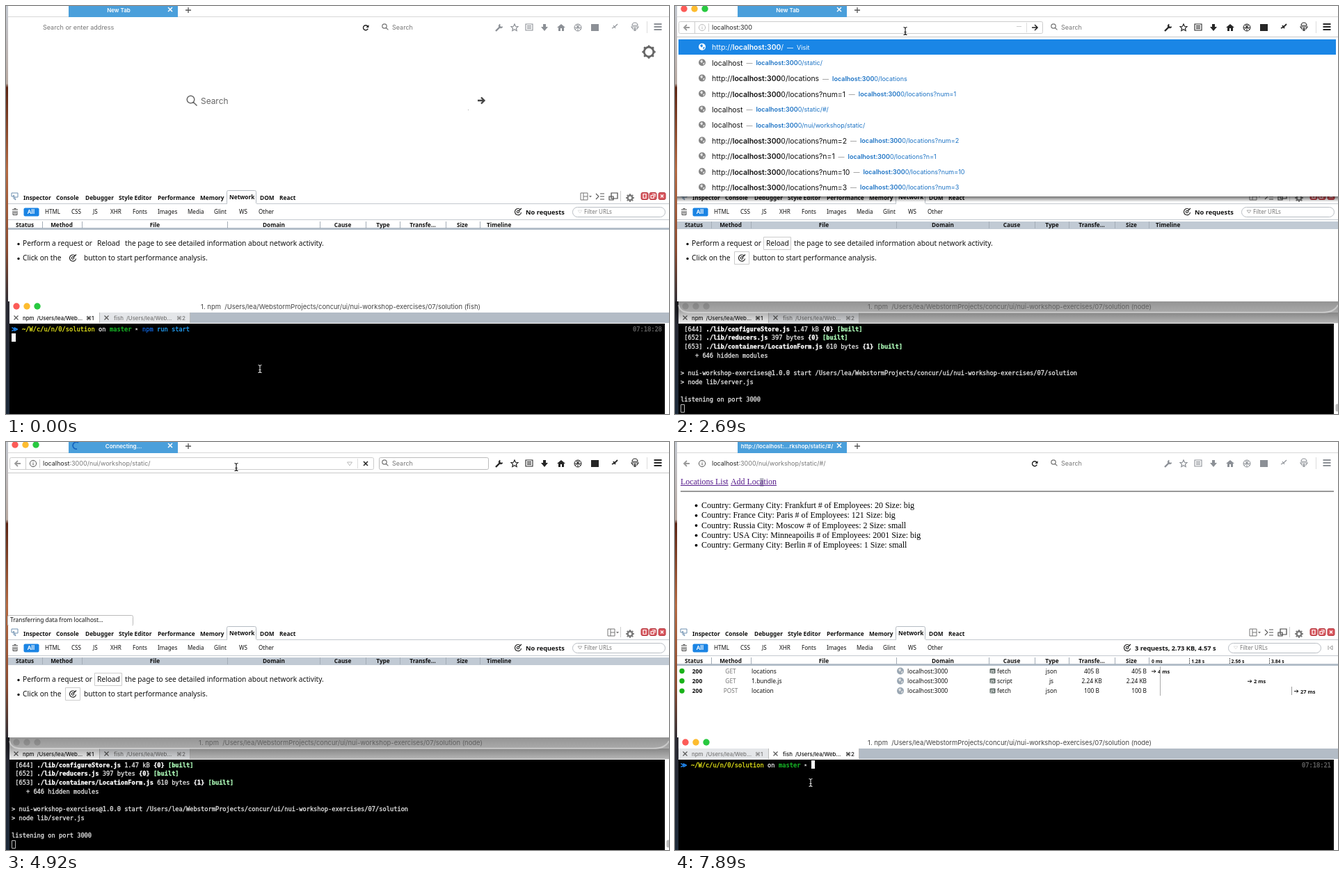
Animation of 953x587 px, one loop 8 s. Source, as an HTML page with a canvas:

```html
<!DOCTYPE html>
<html lang="en">
<head>
<meta charset="utf-8">
<style>
html, body { margin: 0; width: 100%; height: 100%; overflow: hidden; background: #fff; }
canvas { display: block; }
</style>
</head>
<body>
<canvas id="stage" width="953" height="587"></canvas>
<script>
const g = document.getElementById('stage').getContext('2d');
const LOOP = 8000;

const ui = (size, weight = 400) => `${weight} ${size}px Inter, sans-serif`;
const dev = (size, weight = 400) => `${weight} ${size}px "Noto Sans", sans-serif`;
const mono = (weight = 400) => `${weight} 8.7px "DejaVu Sans Mono", monospace`;
const serif = '11.95px "Liberation Serif", serif';

const path = '/Users/lea/WebstormProjects/concur/ui/nui-workshop-exercises/07/solution';
const script = name => `> nui-workshop-exercises@1.0.0 ${name} ${path}`;
const babel = file => `src/${file}.js -> lib/${file}.js`;
// Asterisks toggle bold.
const log = [
  null, '', script('prestart'), '> npm run prepack', '', '',
  script('prepack'), '> npm run build', '', '',
  script('build'), '> ../../node_modules/.bin/babel src --out-dir=lib', '',
  babel('app'), babel('configureStore'), babel('containers/LocationForm'),
  babel('reducers'), babel('server'), '',
  ' [644] *./lib/configureStore.js* 1.47 kB *{0}* *[built]*',
  ' [652] *./lib/reducers.js* 397 bytes *{0}* *[built]*',
  ' [653] *./lib/containers/LocationForm.js* 610 bytes *{1}* *[built]*',
  '    + 646 hidden modules', '',
  script('start'), '> node lib/server.js', '', 'listening on port 3000'
];

const loc = 'localhost:3000/';
const hit = s => ['http://' + loc + s, loc + s];
const local = s => ['localhost', loc + s];
const example = s => ['example', loc + 'nui/example/' + s];
const broadHits = [
  local('static/'), hit('locations'), hit('locations?num=1'), local('static/#/'),
  local('nui/workshop/static/'), hit('locations?num=2'), hit('locations?n=1'),
  hit('locations?num=10'), hit('locations?num=3')
];
const nuiHits = [
  local('nui/workshop/static/'), example('counter'), local('nui/workshop/static/#/add'),
  local('nui/workshop/static/#/'), example('page')
];

// Each key holds until the next one: [time, ...values].
const at = (t, keys) => keys.filter(k => k[0] <= t).pop().slice(1);
const pointer = [
  [0, 365, 522], [440, 363, 485], [590, 356, 385], [740, 346, 235], [890, 336, 95],
  [1040, 331, 42], [1190, 331, 36], [6120, 332, 36], [6270, 316, 42], [6420, 245, 50],
  [6570, 160, 56], [6720, 124, 58], [7300, 140, 130], [7450, 176, 300], [7590, 198, 425],
  [7740, 203, 449], [7890, 195, 490]
];
const lineCount = [[0, 1], [740, 5], [1190, 9], [1940, 14], [2090, 18], [2390, 23], [2540, 27], [2690, 28]];
const address = [
  [0, ''], [2090, 'loc'], [2390, 'localhost'], [2540, 'localhost:3'], [2690, 'localhost:300'],
  [3880, loc + 'nui'], [4030, loc + 'nui/workshop/static/'], [5220, loc + 'nui/workshop/static/#/']
];

function rect(x, y, w, h, color) {
  g.fillStyle = color;
  g.fillRect(x, y, w, h);
}
function fade(y, h, stops) {
  const shade = g.createLinearGradient(0, y, 0, y + h);
  stops.forEach(([p, c]) => shade.addColorStop(p, c));
  return shade;
}
function box(x, y, w, h, r, line, fill) {
  g.beginPath();
  g.roundRect(x + .5, y + .5, w, h, r);
  if (fill) { g.fillStyle = fill; g.fill(); }
  if (line) { g.strokeStyle = line; g.lineWidth = 1; g.stroke(); }
}
function dot(x, y, r, color) {
  g.beginPath();
  g.arc(x, y, r, 0, 7);
  g.fillStyle = color;
  g.fill();
}
// Draws text and returns the x where it ends.
function text(s, x, y, font, color = '#111', align = 'left') {
  g.font = font;
  g.fillStyle = color;
  g.textAlign = align;
  g.fillText(s, x, y);
  return x + g.measureText(s).width;
}
// Terminal text, thickened a little.
function term(s, x, y, color, weight = 400) {
  const end = text(s, x, y, mono(weight), color);
  g.strokeStyle = color;
  g.lineWidth = .3;
  g.strokeText(s, x, y);
  return end;
}
function icon(d, x, y, color, width = 1.3, fill) {
  g.save();
  g.translate(x, y);
  const p = new Path2D(d);
  g.strokeStyle = g.fillStyle = color;
  g.lineWidth = width;
  if (fill) g.fill(p);
  if (width) g.stroke(p);
  g.restore();
}
const circle = r => `M${r} 0A${r} ${r} 0 1 1 ${-r} 0A${r} ${r} 0 1 1 ${r} 0Z`;
const cross = 'M-3 -3L3 3M3 -3L-3 3';
const arrow = 'M-4 0H4M0 -4L4 0L0 4';
const lens = (x, y, r, color) =>
  icon(`${circle(r)}M${r * .7} ${r * .7}L${r * 1.7} ${r * 1.7}`, x, y, color, r > 4 ? 1.5 : 1.2);

function globe(x, y, color, land = '#e4e4e4') {
  dot(x, y, 5, color);
  icon('M-3 -2L0 -4L1 -1L-1 1ZM1 1L4 0L2 4Z', x, y, land, 0, true);
}
function gear(x, y, r, color, width) {
  icon(circle(r), x, y, color, width);
  for (let i = 0; i < 8; i++) {
    const a = i * Math.PI / 4;
    dot(x + Math.cos(a) * (r + 1.5), y + Math.sin(a) * (r + 1.5), width * .55, color);
  }
}
function stopwatch(x, y) {
  icon('M3.5 -3A4.6 4.6 0 1 0 4.6 1', x, y, '#222', 1.2);
  icon(circle(1.7) + 'M1 -1L5 -5', x, y, '#222', 1.1);
}
function reload(x, y) {
  icon('M3 -1.6A3.5 3.5 0 1 0 3.3 1.5', x, y, '#222', 1.4);
  icon('M4.5 -4V0H.5Z', x, y, '#222', 0, true);
}
function lights(y, colors) {
  const x = y < 20 ? 13 : 15;
  colors.forEach((c, i) => dot(x + 15 * i, y, 4.7, c));
}
const bright = ['#fc5b57', '#fdbc2f', '#28c940'];

function drawTabs(active, title, busy) {
  rect(3, 0, 950, 45, '#fff');
  rect(3, 15, 950, 1, '#d8d8d8');
  rect(90, 0, 157, 16, '#4a9fdb');
  if (active) lights(4, bright);
  text(title, title.length > 20 ? 161 : busy ? 169 : 162, 9, ui(8, 600), '#fff', 'center');
  if (busy) icon('M3 -4A5 5 0 1 0 1 5', 101, 5, '#1666c0', 1.8);
  icon(cross, 236, 5, '#fff', 1.5);
  icon('M-4 0H4M0 -4V4', 262, 6, '#555');
}

function drawToolbar(t, active, url, typing, busy, loaded) {
  const color = active ? '#262626' : '#8c9096';
  const open = t >= 4470;
  if (active) {
    rect(3, 44, 950, 1, '#c9c9c9');
    box(5, 22, 523, 17, 2, '#ccc', '#fff');
    rect(28, 23, 1, 17, '#ccc');
    rect(505, 24, 1, 14, '#ddd');
    if (open) {
      box(536, 22, 157, 17, 2, '#bbb', '#fff');
      icon('M-3.5 -2H3.5L0 3Z', 494, 31, '#aaa', .8);
    } else rect(491, 29, 7, 1, '#ccc');
  }
  if (active || open) icon('M4 0H-4M0 -4L-4 0L0 4', 17, 31, '#999', 1.8);
  if (open || (url && t < 3880)) {
    icon(circle(4.6) + 'M0 -.8V2.6M0 -2.8V-1.8', 39, 31, open ? '#555' : '#bbb', 1);
    if (active) rect(48, 25, 1, 12, '#ccc');
  }
  if (!url) text('Search or enter address', 53, 34, ui(9), '#777');
  else {
    const split = typing ? url.length : 9;
    const x = text(url.slice(0, split), 53, 34, ui(9), '#222');
    const end = text(url.slice(split), x, 34, ui(9), '#777');
    if (t >= 3280 && t < 4030) rect(Math.round(end), 25, 1, 12, '#111');
  }
  if (busy) icon(cross, 517, 31, '#222', 1.5);
  else if (loaded || !active) reload(517, 31);
  else icon(arrow, 517, 31, '#222', 1.5);
  lens(544, 29, 3.2, '#777');
  text('Search', 555, 34, ui(9), '#777');

  icon('M-5 5L1 -1', 709, 31, color, 2.4);
  icon('M1 -5A3 3 0 1 0 5 -1L2 -1L1 -2Z', 709, 31, color, .8, true);
  icon('M0 -5L1.5 -1.7L5 -1.4L2.4 1L3.2 4.6L0 2.8L-3.2 4.6L-2.4 1L-5 -1.4L-1.5 -1.7Z', 731, 31, color, 1.2);
  icon('M-5 -4H5V5H-5ZM-3 -1.5H3M-3 .5H3M-3 2.5H3', 752, 30, color, 1.1);
  icon('M-2 -5H2V-1H5L0 5L-5 -1H-2Z', 774, 31, color, 0, true);
  icon('M0 -5L6 0H4V5H1V1H-1V5H-4V0H-6Z', 798, 31, color, 0, true);
  icon(circle(5) + 'M-5 0H5M-4 3L3 -4M-3 -4L4 3M0 -5V5', 822, 31, color, 1);
  rect(841, 26, 11, 10, color);
  icon('M-4 2L0 0L4 -4M-2 -2L1 2', 875, 30, color, active ? 1.8 : 1.1);
  icon('M-4 -2A4 4 0 0 1 4 -2ZM-5 0H5L3 3H-3Z', 904, 30, color, 1.1);
  icon('M0 1V6M-2 5H2', 904, 30, color, 1.2);
  rect(921, 22, 1, 17, '#ddd');
  icon('M-5.5 -4H5.5M-5.5 0H5.5M-5.5 4H5.5', 937, 30, color, 2);
}

function drawNewTab() {
  gear(924, 66, 6.8, '#666', 2.8);
  lens(265.5, 134.5, 5.3, '#666');
  text('Search', 280, 141, ui(11.9), '#666');
  icon('M-5 0H4M0 -4.5L4.5 0L0 4.5', 683, 136, '#444', 2.3);
  rect(664, 149, 1, 1, '#aaa');
}

function drawPage(t) {
  if (t >= 6870) {
    g.font = serif;
    rect(80 + g.measureText('Add Loc').width, 52, 5.3, 12, '#b9b9c4');
  }
  [['Locations List', 8], ['Add Location', 80]].forEach(([s, x]) => {
    const end = text(s, x, 61, serif, '#551a8b');
    rect(x, 62, end - x, 1, '#551a8b');
  });
  rect(8, 70, 939, 2, '#999');
  const rows = [
    ['Germany', 'Frankfurt', 20, 'big'], ['France', 'Paris', 121, 'big'],
    ['Russia', 'Moscow', 2, 'small'], ['USA', 'Minneapoilis', 2001, 'big']
  ];
  if (t >= 7160) rows.push(['Germany', 'Berlin', 1, 'small']);
  rows.forEach(([country, city, staff, size], i) => {
    const y = 95 + 14.3 * i;
    dot(30.5, y - 3.5, 1.9, '#000');
    text(`Country: ${country} City: ${city} # of Employees: ${staff} Size: ${size}`, 38, y, serif, '#000');
  });
}

function drawDevtools(t, active, busy, requests) {
  rect(3, 265, 950, 160, '#fff');
  icon('M-4 -4H5V2H1M-4 -4V1H-1M-1 -1L2 6L-1 4Z', 12, 273, '#6d8fb0', 1);
  rect(3, 284, 950, 1, '#c4c9cf');
  box(317, 265, 42, 20, 2, '#b5bbc2', '#fff');
  rect(318, 284, 42, 2, '#fff');
  [['Inspector', 25], ['Console', 72], ['Debugger', 114], ['Style Editor', 162], ['Performance', 218],
   ['Memory', 279], ['Network', 321], ['DOM', 365], ['React', 393]]
    .forEach(([s, x]) => text(s, x, s === 'Network' ? 278 : 279, dev(8.3, 700)));
  const layoutX = busy ? 870 : 831;
  icon('M-5 -5H5V5H-5ZM-1 -5V5M-1 0H5', layoutX, 274, '#777', 1);
  icon('M-2 -1H2L0 1.5Z', layoutX + 9, 274, '#777', 0, true);
  if (!busy) {
    icon('M-6 -4L-2 0L-6 4M0 -4H6M0 0H6M0 4H6', 854, 274, '#555', 1.1);
    icon('M-3 -5H6V3H-3ZM-6 0H0V5H-6Z', 873, 274, '#444', 1.2);
  }
  rect(883, 266, 1, 15, '#ccc');
  gear(897, 276, 3.3, '#777', 2.2);
  [918, 930, 943].forEach((x, i) => {
    box(x - 5.5, 268, 10, 10, 2, '#b33a42', '#d9565d');
    icon(['M-2 -3H2V3H-2Z', 'M-3 -1H1V3H-3ZM-1 -3H3V1', 'M-2 -2L2 2M2 -2L-2 2'][i], x, 273.5, '#fff', 1.2);
  });

  icon('M-4 -3H4M-1.5 -4.5H1.5M-3 -1V4.5H3V-1M-1 -1V3M1 -1V3', 13, 296, '#444', 1);
  box(25, 290, 22, 12, 2, null, '#1a84e4');
  text('All', 36, 299, dev(8.1, 700), '#fff', 'center');
  [['HTML', 56], ['CSS', 94], ['JS', 125], ['XHR', 150], ['Fonts', 182], ['Images', 218],
   ['Media', 261], ['Glint', 299], ['WS', 335], ['Other', 363]]
    .forEach(([s, x]) => text(s, x, 299, dev(8.1)));
  const [summary, x] = [
    ['No requests', 747], ['One request, 0.40 KB, 0.00 s', 654],
    ['2 requests, 2.63 KB, 2.98 s', 661], ['3 requests, 2.73 KB, 4.57 s', 661]
  ][requests];
  stopwatch(x - 11, 296);
  text(summary, x, 300, dev(9.25, 700));
  const filterX = requests ? 795 : 814;
  box(filterX, 289, 133, 14, 7, '#b9bec4', '#fff');
  icon('M-3 -2H3L0 2Z', filterX + 11, 296, active ? '#999' : '#ddd', .8);
  text('Filter URLs', filterX + 17, 299, dev(8), '#777');
  if (requests) icon('M-3 -3V3M3 -3L-1 0L3 3Z', 942, 296, '#999', 1);

  rect(3, 307, 950, 1, '#c4c9cf');
  if (active) rect(3, 310, 950, 11, '#c1cad4');
  else rect(3, 319, 950, 3, '#b3bec9');
  [52, 109, 318, 451, 517, 566, 632, 681].forEach(x => rect(x, 310, 1, 10, '#a4adb7'));
  [['Status', 27], ['Method', 80], ['File', 214], ['Domain', 385], ['Cause', 484], ['Type', 542],
   ['Transfe…', 599], ['Size', 656]].forEach(([s, x]) => text(s, x, 318, dev(8.2, 700), '#111', 'center'));

  if (!requests) {
    text('Timeline', 691, 318, dev(8.2, 700));
    dot(18, 342.5, 1.7, '#111');
    dot(18, 363.5, 1.7, '#111');
    if (active) {
      box(127, 332, 39, 18, 0, '#ccc');
      box(85, 353, 21, 18, 0, '#ccc');
    }
    const font = dev(10.18);
    text('Perform a request or', 24, 345, font);
    text('Reload', 131, 345, font);
    text('the page to see detailed information about network activity.', 171, 345, font);
    text('Click on the', 24, 366, font);
    stopwatch(96, 362.5);
    text('button to start performance analysis.', 112, 366, font);
    return;
  }
  const single = requests === 1;
  const ticks = single ? ['0 ms', '80 ms', '160 ms', '240 ms'] : ['0 ms', '1.28 s', '2.56 s', '3.84 s'];
  ticks.forEach((s, i) => {
    const x = 682 + i * (single ? 59.5 : 57.3);
    text(s, x + 3, 318, dev(6.8, 700));
    if (i) for (let y = 311; y < 320; y += 3) rect(Math.round(x), y, 1, 2, '#555');
  });
  [['GET', 'locations', 'fetch', 'json', '405 B', single ? 688 : 685, '4 ms'],
   ['GET', '1.bundle.js', 'script', 'js', '2.24 KB', 823, '2 ms'],
   ['POST', 'location', 'fetch', 'json', '100 B', 890, '27 ms']]
    .slice(0, requests).forEach(([method, file, cause, type, size, x, time], i) => {
      const y = 332.5 + 14.3 * i;
      dot(10, y - 3, 3.7, '#18b218');
      text('200', 32, y, dev(8.4, 700), '#111', 'center');
      text(method, 80, y, dev(8.3), '#777', 'center');
      text(file, 110, y, dev(8.5));
      globe(324, y - 3, '#9aa7b3');
      text('localhost:3000', 334, y, dev(8.6));
      box(452, y - 7, 8, 7, 1, null, '#5d6b66');
      text('JS', 456.5, y - .7, dev(6, 700), '#fff', 'center');
      text(cause, 463, y, dev(8.4));
      text(type, 541, y, dev(8.3), '#111', 'center');
      text(size, 599, y, dev(8.3), '#111', 'center');
      text(size, 678, y, dev(8.3), '#111', 'right');
      icon('M0 0H6M3.5 -2L6 0L3.5 2', x, y - 2.5, '#111', 1);
      text(time, x + 9, y + .5, dev(7.4, 600));
    });
  if (single) {
    rect(3, 336, 950, 1, '#ccd2d9');
    rect(683, 323, 2, 13, '#d98a8a');
  } else rect(697, 323, 1, 42, '#aaa');
  if (requests === 3) rect(886, 352, 1, 12, '#999');
}

// Draws s with every occurrence of key in bold.
function marked(s, key, x, y, size, color) {
  s.split(key).forEach((part, i) => {
    if (i) x = text(key, x, y, ui(size, 600), color);
    x = text(part, x, y, ui(size), color);
  });
  return x;
}
function drawSuggestions(t, url) {
  const narrow = t >= 3880;
  const key = narrow ? loc + 'nui' : url;
  const rows = [['http://' + key + (narrow ? '' : '/'), 'Visit'], ...(narrow ? nuiHits : broadHits)];
  const bottom = narrow ? 187 : 274;
  const picked = t >= 4030 ? 1 : 0;
  rect(3, bottom, 950, 8, fade(bottom, 8, [[0, 'rgba(0,0,0,.55)'], [1, 'rgba(0,0,0,0)']]));
  rect(3, 45, 950, bottom - 45, '#fff');
  rows.forEach(([title, link], i) => {
    const mid = 59.3 + 22.4 * i;
    const on = i === picked;
    if (on) rect(5, mid - 11.3, 945, 22, '#1a86e6');
    if (on) globe(39, mid - .5, '#fff', '#1a86e6');
    else globe(39, mid - .5, '#858585');
    let x = marked(title, key, 53, mid + 4, 10.4, on ? '#fff' : '#111');
    x = text('—', x + 5, mid + 3.5, ui(9), on ? '#fff' : '#888') + 5;
    marked(link, key, x, mid + 3.5, 9, on ? '#fff' : '#1b72c4');
  });
}

function drawPrompt(y, command) {
  term('≫', 8, y, '#2390ff', 700);
  term('~/W/c/u/n/0/solution', 23, y, '#e3e31a');
  term('on', 133, y, '#eee');
  term('master', 149, y, '#19c82a');
  term('⋆', 185, y, '#ddd');
  if (command) {
    term('npm', 196, y, '#0f62d8');
    term('run start', 217, y, '#24a5ff');
  }
  term(command ? '07:18:28' : '07:18:21', 901, y, '#666');
}
function drawTerminal(t, behind) {
  const second = t >= 7890;
  rect(5, 425, 948, 32, '#fff');
  lights(432, behind ? ['#ddd', '#ddd', '#ddd'] : bright);
  const job = t < 1040 ? 'fish' : 'node';
  text(`1. npm  ${path} (${job})`, 481, 436, ui(9.45), behind ? '#999' : '#444', 'center');
  rect(265, 441, 688, 15, behind ? '#c4c4c4' : '#b3bcc6');
  ['npm', 'fish'].forEach((name, i) => {
    const x = 5 + 130 * i;
    const on = second === (i === 1);
    const c = on ? '#111' : '#777';
    rect(x, 441, 130, 15, on ? '#fff' : '#e4e6e9');
    rect(x + 129, 441, 1, 15, '#bbb');
    icon(cross, x + 9.5, 448.5, '#555', 1.1);
    text(`${name}  /Users/lea/Web...`, x + (i ? 20 : 19), 451.5, ui(7.8, 500), c);
    text('⌘' + (i + 1), x + 110, 451.5, ui(8, 500), c);
  });
  if (behind) {
    rect(0, 425, 953, 32, fade(425, 32, [
      [0, 'rgba(0,0,0,.42)'], [.45, 'rgba(0,0,0,.34)'], [1, 'rgba(0,0,0,.06)']
    ]));
    icon('M5 430Q7 441 22 441H930Q948 441 953 430', 0, 0, 'rgba(255,255,255,.4)', 2);
  }
  rect(5, 457, 942, 130, '#000');
  rect(947, 457, 6, 130, '#fff');
  if (behind) box(949, 572, 5, 11, 3, null, '#bbb');
  const rowY = i => 467.5 + 12.68 * i;
  if (second) {
    drawPrompt(rowY(0), false);
    rect(196, 458, 5, 12, '#fff');
    return;
  }
  const lines = log.slice(0, at(t, lineCount)[0]).slice(-9);
  lines.forEach((line, i) => {
    if (line === null) return drawPrompt(rowY(i), true);
    let x = 8;
    line.split('*').forEach((part, k) => {
      const color = part === '[built]' ? '#a9f5b4' : k % 2 ? '#fff' : '#e6e6e6';
      x = term(part, x, rowY(i), color, k % 2 ? 700 : 400);
    });
  });
  const y = Math.round(rowY(lines.length)) - 9;
  if (behind) box(8, y, 5, 11, 0, '#bbb');
  else rect(8, y, 6, 12, '#fff');
}

function drawDesktop() {
  rect(0, 0, 953, 587, fade(0, 587, [
    [0, '#c3c8d0'], [.19, '#b9aaa2'], [.2, '#5b2413'], [.4, '#b56a42'],
    [.6, '#8a4a30'], [.73, '#2a2a33'], [1, '#1d2a3a']
  ]));
}

function draw(t) {
  const active = t >= 1040 && t < 7740;
  const busy = t >= 4620 && t < 5220;
  const loaded = t >= 5220;
  const typing = t >= 2090 && t < 4470;
  const requests = t < 5220 ? 0 : t < 6720 ? 1 : t < 7160 ? 2 : 3;
  const [url] = at(t, address);

  drawDesktop();
  drawTerminal(t, active);
  rect(3, 0, 950, 425, '#fff');
  drawTabs(active, loaded ? 'http://localhost:...rkshop/static/#/' : busy ? 'Connecting...' : 'New Tab', busy);
  drawToolbar(t, active, url, typing, busy, loaded);
  if (loaded) drawPage(t);
  else if (!busy) drawNewTab();
  drawDevtools(t, active, busy, requests);
  if (busy) {
    box(2, 249, 180, 15, 2, '#bbb', '#fff');
    rect(3, 264, 179, 1, '#fff');
    text('Transferring data from localhost...', 6, 259, dev(8.4));
  }
  if (typing) drawSuggestions(t, url);

  const [x, y] = at(t, pointer);
  icon('M-2.5 -5.5Q0 -5.5 0 -3.5Q0 -5.5 2.5 -5.5M0 -4V4M-2.5 5.5Q0 5.5 0 3.5Q0 5.5 2.5 5.5M-1.5 1.5H1.5',
    x, y, y > 457 ? '#ddd' : '#111', 1.1);
}

function tick(now) {
  draw(now % LOOP);
  requestAnimationFrame(tick);
}
requestAnimationFrame(tick);
</script>
</body>
</html>
```
